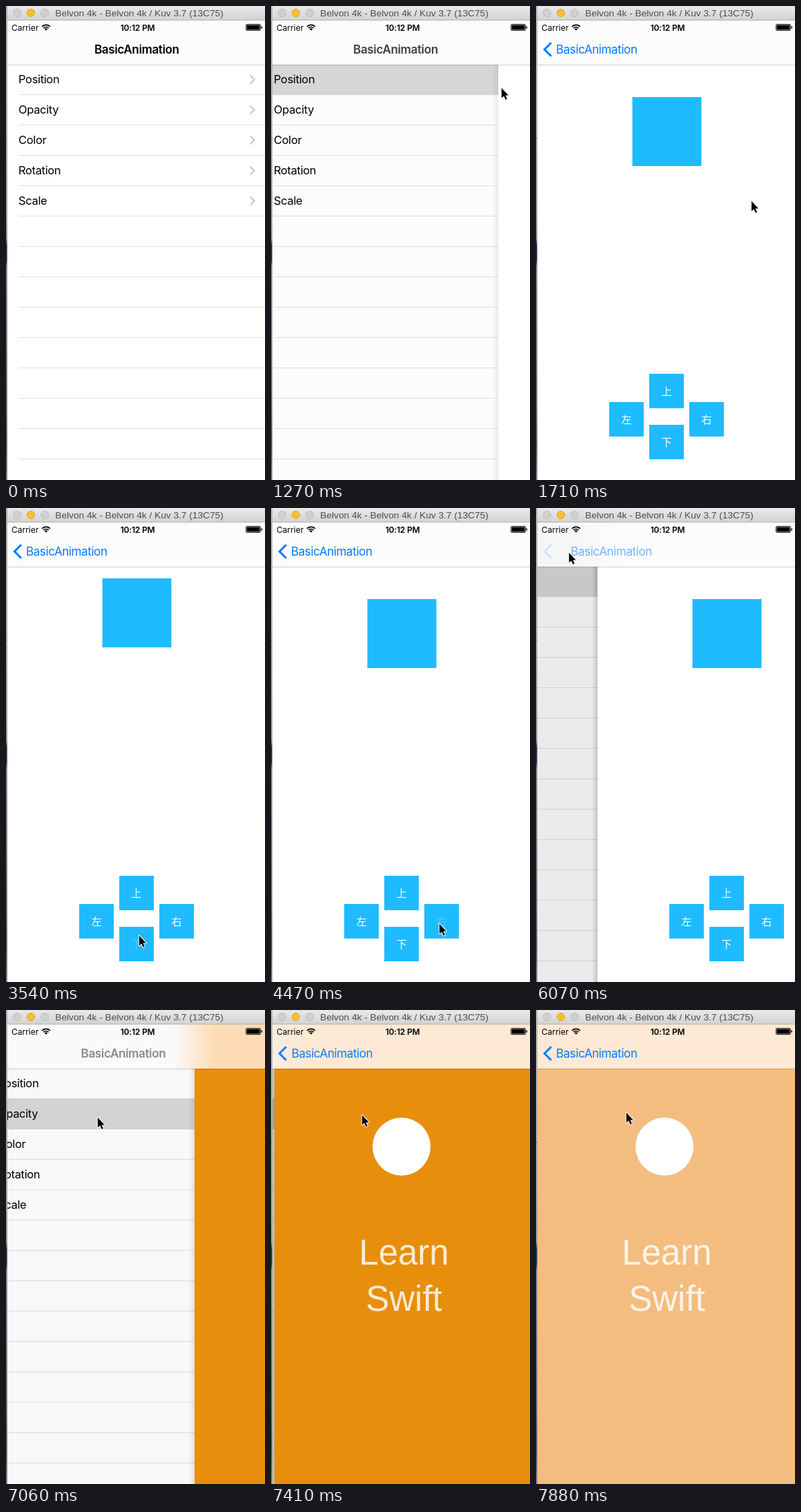
These frames come from a looping animation (375x687 px, 8000 ms). An HTML page with a canvas:

```html
<!DOCTYPE html>
<html lang="en">
<head>
<meta charset="utf-8">
<title>Basic animation demo</title>
<style>
html, body { margin: 0; width: 100%; height: 100%; overflow: hidden; background: #fff; }
canvas { display: block; width: 375px; height: 687px; }
</style>
</head>
<body>
<canvas id="stage"></canvas>
<script>
const W = 375, H = 687, LOOP = 8000, LEFT = 2, BAR = 85, ROW = 44;
const BLUE = '#1fbbff', TINT = '#007aff';
const SANS = 'Inter, "Open Sans", sans-serif';
const ARIAL = '"Liberation Sans", Arial, sans-serif';
const CJK = '"Noto Sans CJK SC", "Noto Sans CJK", sans-serif';
const ITEMS = ['Position', 'Opacity', 'Color', 'Rotation', 'Scale'];
const BUTTONS = [['上', 164, 533, 2580], ['左', 106, 574, -1], ['右', 222, 574, 4470], ['下', 164, 607, 3540]];
const POINTER = [
  [500, 372, 151], [880, 333, 118], [1500, 333, 118], [1710, 312, 280], [1880, 185, 620],
  [2060, 185, 620], [2230, 187, 567], [2980, 187, 567], [3310, 192, 619], [3940, 192, 619],
  [4240, 243, 602], [4870, 243, 602], [5200, 55, 122], [5320, 55, 122], [5380, 53, 92],
  [5670, 47, 64], [6480, 47, 64], [6760, 132, 155], [7200, 132, 155], [7610, 130, 148]
];
const PUSH_FIRST = 1230, POP = 6010.5, PUSH_SECOND = 6992.3;

const canvas = document.getElementById('stage');
const ctx = canvas.getContext('2d');
const scale = window.devicePixelRatio || 1;
canvas.width = W * scale;
canvas.height = H * scale;

const clamp = v => Math.max(0, Math.min(1, v));
const ramp = (t, a, b) => clamp((t - a) / (b - a));
const smooth = v => v * v * (3 - 2 * v);
const ease = (t, a, b) => smooth(ramp(t, a, b));
const mix = (a, b, k) => `rgb(${a.map((v, i) => Math.round(v + (b[i] - v) * k))})`;

// Critically damped slide that settles in 480 ms.
const damped = ms => 1 - (1 + ms * 0.015) * Math.exp(-ms * 0.015);
const slide = ms => ms <= 0 ? 0 : ms >= 480 ? 1 : damped(ms) / damped(480);

function depthAt(t) {
  if (t < POP) return slide(t - PUSH_FIRST);
  if (t < PUSH_SECOND) return 1 - slide(t - POP);
  return slide(t - PUSH_SECOND);
}

function rect(x, y, w, h, fill) {
  ctx.fillStyle = fill;
  ctx.fillRect(x, y, w, h);
}

function disc(x, y, r, fill, stroke) {
  ctx.beginPath();
  ctx.arc(x, y, r, 0, Math.PI * 2);
  ctx.fillStyle = fill;
  ctx.fill();
  if (stroke) {
    ctx.strokeStyle = stroke;
    ctx.lineWidth = 1;
    ctx.stroke();
  }
}

function text(str, x, y, font, fill, align = 'left', spacing = 0) {
  ctx.font = font;
  ctx.fillStyle = fill;
  ctx.textAlign = align;
  ctx.letterSpacing = spacing + 'px';
  ctx.fillText(str, x, y);
}

function line(points, stroke, width) {
  ctx.beginPath();
  points.forEach(([x, y]) => ctx.lineTo(x, y));
  ctx.strokeStyle = stroke;
  ctx.lineWidth = width;
  ctx.stroke();
}

function gradient(x0, y0, x1, y1, stops) {
  const g = ctx.createLinearGradient(x0, y0, x1, y1);
  stops.forEach(([at, color]) => g.addColorStop(at, color));
  return g;
}

function withAlpha(alpha, draw) {
  if (alpha <= 0) return;
  ctx.save();
  ctx.globalAlpha = alpha;
  draw();
  ctx.restore();
}

function drawList(t, depth) {
  ctx.save();
  ctx.translate(Math.round(-110 * depth), 0);
  rect(LEFT, BAR, W, H, '#fff');
  for (let y = BAR + ROW - 1; y < H; y += ROW) rect(18, y, W, 1, '#e1e0e3');
  const selected = [t < 1180 ? 0 : 1 - ramp(t, 6300, 6650), t < 6940 ? 0 : 1];
  selected.forEach((a, i) =>
    withAlpha(a, () => rect(LEFT, BAR - 1 + ROW * i, W, ROW + 1, '#d9d9d9')));
  ITEMS.forEach((name, i) => {
    const y = BAR + 21.5 + ROW * i;
    text(name, 18, y + 5.5, `16.5px ${SANS}`, '#000', 'left', -0.35);
    line([[353.5, y - 6], [359.5, y], [353.5, y + 6]], '#c7c7cc', 2);
  });
  ctx.restore();
}

function drawPositionPage(t) {
  rect(LEFT, BAR, W, H, '#fff');
  // Leaving the page lays it out again, which drops the sideways move.
  const x = 139.5 + (t < 5960 ? 30 * ease(t, 4570, 5020) : 0);
  const y = 132 - 30 * ease(t, 2680, 3130) + 30 * ease(t, 3640, 4090);
  rect(x, y, 100, 100, BLUE);
  for (const [label, bx, by, press] of BUTTONS) {
    rect(bx, by, 50, 50, BLUE);
    const held = press > 0 && t >= press ? 1 - ramp(t, press + 100, press + 300) : 0;
    withAlpha(1 - 0.78 * held, () =>
      text(label, bx + 25, by + 31, `300 15px ${CJK}`, '#fff', 'center'));
  }
}

function drawOpacityPage(t) {
  const fade = t < 7790 ? 0 : t < 7880 ? 0.5 : 1;
  rect(LEFT, BAR, W, H, mix([232, 142, 13], [243, 189, 128], fade));
  disc(186, 198, 42, '#fff');
  withAlpha(0.82, () => {
    text('Learn', 189.5, 368.5, `51px ${ARIAL}`, '#fff', 'center');
    text('Swift', 189.5, 435.5, `51px ${ARIAL}`, '#fff', 'center');
  });
}

function drawNav(depth, edge, orange) {
  const shade = Math.round(252 - 8 * depth);
  const near = `rgb(${shade},${shade},${shade})`;
  const far = orange ? mix([255, 215, 172], [253, 233, 212], depth) : '#fcfcfc';
  let fill = depth === 0 ? '#fcfcfc' : far;
  if (depth > 0 && depth < 1) fill = gradient(edge - 32, 0, edge + 28, 0, [[0, near], [1, far]]);
  rect(LEFT, 21, W, 64, fill);
  rect(LEFT, BAR, W, 1, 'rgba(0,0,0,.18)');

  withAlpha(clamp(1 - 2 * depth), () =>
    text('BasicAnimation', 128 - 70 * depth, 69, `600 17px ${SANS}`, '#000', 'left', -0.35));
  withAlpha(clamp(2 * depth - 1), () =>
    text('BasicAnimation', 29 + 92 * (1 - depth), 69, `17px ${SANS}`, TINT, 'left', -0.4));
  withAlpha(clamp((depth - 0.73) / 0.27), () =>
    line([[22, 53.3], [12.3, 63], [22, 72.7]], TINT, 3));
}

function drawStatus() {
  text('Carrier', 8, 35.5, `12px ${SANS}`, '#000');
  text('10:12 PM', 190.5, 35.5, `600 12px ${SANS}`, '#000', 'center', -0.2);
  for (const r of [9, 5.8]) {
    ctx.beginPath();
    ctx.arc(58, 35.5, r - 0.8, -Math.PI * 0.76, -Math.PI * 0.24);
    ctx.strokeStyle = '#000';
    ctx.lineWidth = 1.7;
    ctx.stroke();
  }
  ctx.beginPath();
  ctx.moveTo(58, 35.5);
  ctx.arc(58, 35.5, 3, -Math.PI * 0.76, -Math.PI * 0.24);
  ctx.fillStyle = '#000';
  ctx.fill();
  ctx.beginPath();
  ctx.roundRect(347.5, 26.5, 21, 9, 1.5);
  ctx.strokeStyle = '#000';
  ctx.lineWidth = 0.8;
  ctx.stroke();
  rect(348.5, 27.5, 19, 7, '#000');
  rect(369.5, 29.5, 1.5, 3, '#000');
}

function drawWindow() {
  rect(0, 0, W, 21, gradient(0, 0, 0, 20, [[0, '#e9e9e9'], [1, '#d3d3d3']]));
  rect(0, 20, W, 1, '#b4b4b4');
  disc(16, 10, 5.5, '#d0d0d0', '#bcbcbc');
  disc(36, 10, 5.5, '#fdbd30', '#e0a32a');
  disc(56, 10, 5.5, '#d0d0d0', '#bcbcbc');
  text('Belvon 4k - Belvon 4k / Kuv 3.7 (13C75)', 193, 15, `13.7px ${ARIAL}`, '#4c4c4c', 'center');
  rect(0, 0, LEFT, H, gradient(0, 0, 0, H, [
    [0, '#b5b5b5'], [0.27, '#a8a8aa'], [0.49, '#8f9298'], [0.505, '#1e3044'],
    [0.535, '#1e3044'], [0.55, '#80858e'], [0.85, '#5e6676'], [0.92, '#4a5160'], [1, '#71798a']
  ]));
  rect(0, 191, LEFT, 1, '#55585e');
  rect(1, 0, 1, H, 'rgba(165,165,165,.5)');
}

function drawPointer(t) {
  if (t < POINTER[0][0]) return;
  let i = 0;
  while (i < POINTER.length - 2 && t >= POINTER[i + 1][0]) i++;
  const [t0, x0, y0] = POINTER[i], [t1, x1, y1] = POINTER[i + 1];
  const k = ramp(t, t0, t1);
  ctx.save();
  ctx.translate(x0 + (x1 - x0) * k + 0.8, y0 + (y1 - y0) * k + 0.8);
  ctx.beginPath();
  [[0, 0], [0, 14.5], [3.4, 11.6], [5.8, 17], [8, 16], [5.7, 10.8], [10, 10.6]]
    .forEach(([x, y]) => ctx.lineTo(x, y));
  ctx.closePath();
  ctx.lineJoin = 'round';
  ctx.strokeStyle = '#fff';
  ctx.lineWidth = 2;
  ctx.stroke();
  ctx.fillStyle = '#000';
  ctx.fill();
  ctx.restore();
}

function draw(t) {
  const depth = depthAt(t), orange = t >= 6900;
  const edge = LEFT + Math.round(375 * (1 - depth));
  ctx.setTransform(scale, 0, 0, scale, 0, 0);
  ctx.lineJoin = 'miter';
  if (depth < 1) drawList(t, depth);
  if (depth > 0) {
    rect(LEFT, BAR, edge - LEFT, H, `rgba(0,0,0,${0.1 * depth})`);
    const shadow = `rgba(0,0,0,${0.05 + 0.16 * depth})`;
    rect(edge - 8, BAR, 8, H, gradient(edge - 8, 0, edge, 0, [[0, 'rgba(0,0,0,0)'], [1, shadow]]));
    ctx.save();
    ctx.translate(edge - LEFT, 0);
    (orange ? drawOpacityPage : drawPositionPage)(t);
    ctx.restore();
  }
  drawNav(depth, edge, orange);
  drawStatus();
  drawWindow();
  drawPointer(t);
}

const start = performance.now();
function tick() {
  draw((performance.now() - start) % LOOP);
  requestAnimationFrame(tick);
}
tick();
</script>
</body>
</html>
```
